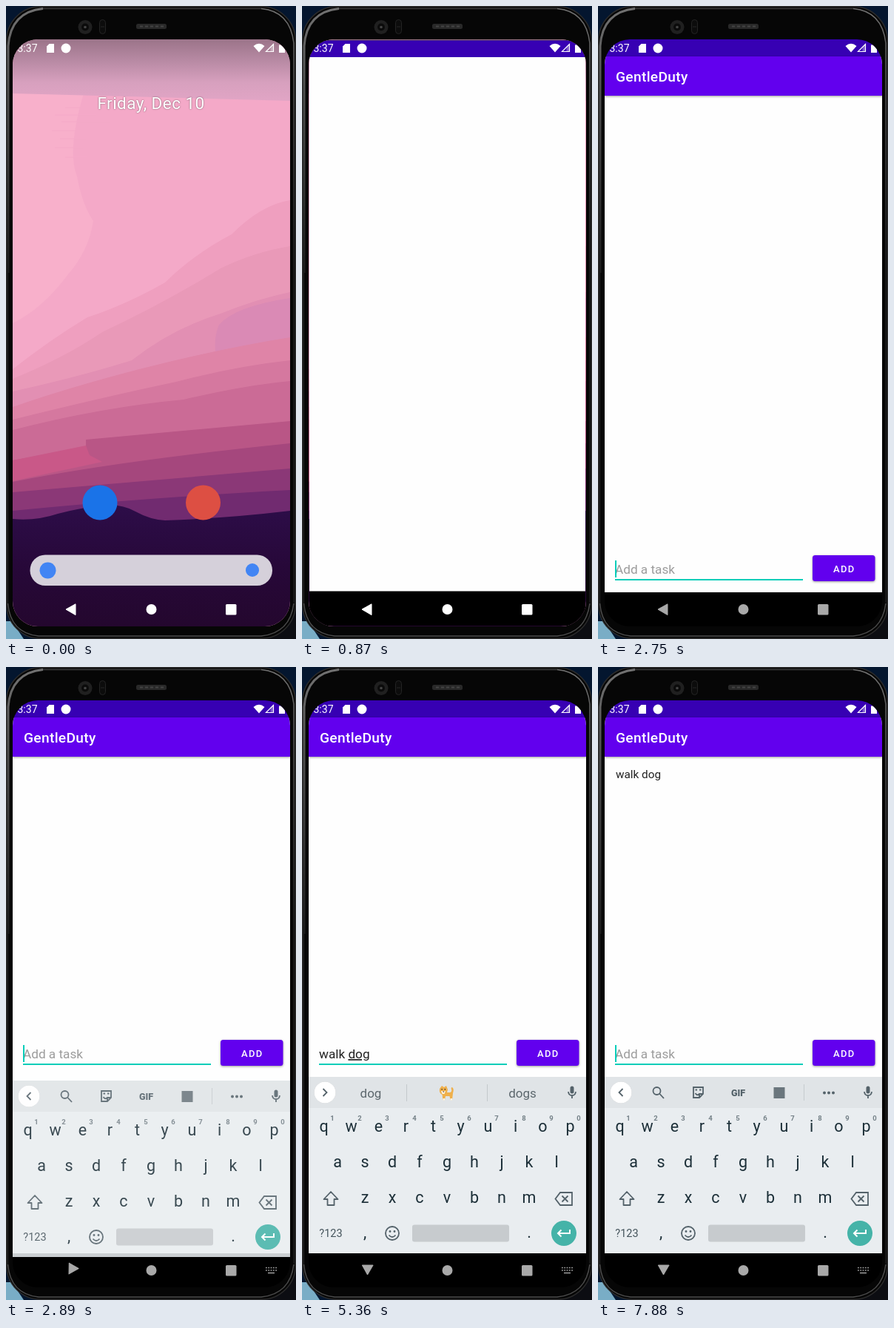
Animation, 392 px wide and 854 px high, one loop 8 s. Source, as an HTML page:

```html
<!DOCTYPE html>
<html lang="en">
<head>
<meta charset="utf-8">
<title>Task list demo</title>
<style>
html, body { margin: 0; width: 100%; height: 100%; overflow: hidden; background: #04162f; }
svg { display: block; width: 392px; height: 854px; font-family: Roboto, "Open Sans", sans-serif; }
[data-on] { visibility: hidden; }
.mid { text-anchor: middle; }
.bold { font-weight: 500; }
.field { font-size: 17.2px; }
.word { font-size: 17px; fill: #5c676d; text-anchor: middle; }
.key { font-size: 21.5px; fill: #1c2f38; text-anchor: middle; }
.digit { font-size: 9.5px; font-weight: 700; fill: #748087; text-anchor: middle; }
.line { fill: none; stroke: #54626a; stroke-width: 1.8; }
.raised { filter: drop-shadow(0 1.5px 1.5px rgba(0, 0, 0, .4)); }
</style>
</head>
<body>
<svg viewBox="0 0 392 854">
  <defs>
    <clipPath id="screen"><rect x="9" y="45" width="375" height="792" rx="34"/></clipPath>
    <linearGradient id="shade" x1="0" y1="0" x2="0" y2="1">
      <stop offset="0" stop-color="#9b7489"/><stop offset=".35" stop-color="#b88aa4"/>
      <stop offset=".7" stop-color="#d7a0be"/><stop offset="1" stop-color="#e1a5c5"/>
    </linearGradient>
    <linearGradient id="night" x1="0" y1="0" x2="0" y2="1">
      <stop offset="0" stop-color="#2d0d49"/><stop offset=".5" stop-color="#270839"/>
      <stop offset="1" stop-color="#24072e"/>
    </linearGradient>
    <linearGradient id="gleam" gradientUnits="userSpaceOnUse" x1="0" y1="0" x2="0" y2="360">
      <stop offset="0" stop-color="#727272"/><stop offset=".3" stop-color="#505050"/>
      <stop offset="1" stop-color="#1c1c1c"/>
    </linearGradient>
    <g id="nav">
      <circle cx="196.5" cy="814" r="7"/>
      <rect x="297" y="807" width="14.5" height="14.5" rx="1.5"/>
    </g>
    <path id="back" d="M81 814 94 806.8V821.6Z" stroke-width="1" stroke-linejoin="round"/>
    <path id="arrow" d="M.5.5V16L4.1 12.7 6.7 18.6 9.2 17.5 6.6 11.7H11.6Z" fill="#fff" stroke="#15152a" stroke-linejoin="round"/>
  </defs>

  <!-- phone body -->
  <path d="M0 830H8L24 854H0Z" fill="#79adc6"/>
  <path d="M340 854H392V800Z" fill="#0c0d12"/>
  <rect x=".7" y=".7" width="390.6" height="852.6" rx="46" fill="#060606" stroke="#2c2c2c" stroke-width="1.4"/>
  <g fill="none" stroke-width="1.5">
    <path d="M3 360V54Q6 8 50 3.500" stroke="url(#gleam)" stroke-width="3"/>
    <path d="M50 3.500H345" stroke="#3c3c3c"/>
    <path d="M345 3.500Q384 7 389 50V360" stroke="url(#gleam)"/>
    <path d="M389 360V805M2.500 360V806" stroke="#1c1c1c"/>
    <path d="M2.500 806Q6 846 44 850H345Q384 846 389 806" stroke="#4c4c4c"/>
  </g>
  <circle cx="107" cy="28.500" r="9.500" fill="#202020"/>
  <circle cx="107" cy="28.500" r="5" fill="#0b0b0b"/>
  <circle cx="107" cy="28.500" r="1.800" fill="#454545"/>
  <rect x="126.500" y="18.500" width="8" height="19" rx="4" fill="#0c0c0c" stroke="#242424"/>
  <path d="M128 28H133" stroke="#242424"/>
  <rect x="176" y="24" width="41" height="7" rx="2.500" fill="#292929"/>
  <path d="M181 27.500H213" stroke="#444" stroke-width="2" stroke-dasharray="4 3"/>

  <g clip-path="url(#screen)">
    <!-- home screen -->
    <g data-on="0-990">
      <path d="M9 45H384V837H9Z" fill="#f4a9c8"/>
      <path d="M9 118H105Q82 195 96 230 103 268 118 290 112 330 84 362 50 408 9 428Z" fill="#f8b0cb"/>
      <path d="M80 137H135M66 147H122M75 156H140M62 168H112M73 179H108M66 191H104M80 204H109" stroke="#f4a9c8"/>
      <path d="M9 45H384V128L200 123 9 118Z" fill="url(#shade)"/>
      <path d="M9 490Q60 450 110 420 160 404 215 373 255 334 305 308 345 268 384 262V700H9Z" fill="#ef9fbf"/>
      <path d="M9 503Q80 474 130 440 215 400 290 354 335 332 384 324V700H9Z" fill="#e999b8"/>
      <path d="M9 520Q100 500 170 478 225 435 290 415 340 395 384 386V700H9Z" fill="#e28fb3"/>
      <path d="M384 394Q310 405 288 430 280 448 284 475H384Z" fill="#da8ab5"/>
      <path d="M9 541Q80 516 180 490 290 462 384 447V700H9Z" fill="#df84a7"/>
      <path d="M9 558Q130 528 230 507 310 486 384 478V700H9Z" fill="#d5789f"/>
      <path d="M9 572Q130 541 240 531 320 512 384 506V700H9Z" fill="#cb6b96"/>
      <path d="M9 613 108 596V585L384 560V700H9Z" fill="#b95686"/>
      <path d="M9 613 108 593 113 606 130 615 9 641Z" fill="#c95888"/>
      <path d="M9 642Q150 614 384 590V700H9Z" fill="#a5477d"/>
      <path d="M9 656 384 624V700H9Z" fill="#8b3877"/>
      <path d="M9 681Q180 664 384 653V700H9Z" fill="#712b70"/>
      <path d="M9 692Q40 695 70 685 100 677 130 674 155 671 175 682 195 693 215 694 300 691 384 681V837H9Z" fill="url(#night)"/>
      <circle cx="127" cy="670" r="23.500" fill="#1a73e8"/>
      <circle cx="266.500" cy="670" r="23.500" fill="#dd4f43"/>
      <rect x="32.500" y="740.500" width="327.500" height="41.500" rx="20.500" fill="#d5d0da"/>
      <circle cx="56.500" cy="761.500" r="11" fill="#4285f4"/>
      <circle cx="333" cy="761" r="9" fill="#4285f4"/>
      <g data-on="710-870">
        <path d="M34 97H359V117H34Z" fill="#3700b3" opacity=".47"/>
        <path d="M34 117H359V745H34Z" fill="#fdfafb" opacity=".52"/>
        <path d="M34 745H359V785H34Z" opacity=".51"/>
      </g>
      <text x="123.500" y="139" font-size="22.500" letter-spacing=".45" fill="#fff" style="text-shadow:0 0 2px #0008">Friday, Dec 10</text>
    </g>

    <!-- launching window, then the app page -->
    <g data-on="870-990">
      <path d="M10 46.500H383V836H10Z"/>
      <path d="M10 46.500H383V69H10Z" fill="#3700b3"/>
      <path d="M10 69H383V789.500H10Z" fill="#fefefe"/>
    </g>
    <g data-on="990-8000">
      <path d="M9 45H384V837H9Z"/>
      <path d="M9 68H384V791H9Z" fill="#fefefe"/>
      <path d="M9 45H384V68H9Z" fill="#3700b3"/>
    </g>
    <g data-on="1520-8000">
      <path class="raised" d="M9 68H384V121H9Z" fill="#6200ee"/>
      <text class="bold" x="24" y="102" font-size="19.200" letter-spacing=".3" fill="#fff">GentleDuty</text>
    </g>
    <text data-on="6990-8000" x="24" y="150" font-size="15.300" fill="#212121">walk dog</text>

    <!-- input row -->
    <g id="row">
      <g data-on="1520-8000">
        <rect class="raised" x="290" y="741" width="84.500" height="35" rx="3.500" fill="#6200ee"/>
      </g>
      <rect data-on="6570-7140" x="290" y="741" width="84.500" height="35" rx="3.500" fill="#fff" opacity=".2"/>
      <text data-on="1520-8000" class="bold" x="318" y="764" font-size="13" letter-spacing="1.300" fill="#fff">ADD</text>
      <path data-on="1520-2630" d="M23 773.500H277" stroke="#777"/>
      <path data-on="2630-8000" d="M23 774H277" stroke="#03cdb9" stroke-width="2"/>
      <text data-on="1520-3850 6840-8000" class="field" x="23" y="766" fill="#9c9c9c">Add a task</text>
      <g id="typed" class="field" fill="#212121"></g>
    </g>

    <!-- keyboard -->
    <g id="kb" data-on="2890-8000">
      <path d="M9 553H384V791H9Z" fill="#e9edf0"/>
      <path d="M9 553H384V595H9Z" fill="#e0e4e7"/>
      <circle cx="31" cy="574" r="14.500" fill="#fff" style="filter:drop-shadow(0 .5px .5px #0003)"/>
      <g data-on="2890-3970 6990-8000">
        <path class="line" d="M33.500 569 28.500 574 33.500 579"/>
        <circle class="line" cx="79.500" cy="572" r="5"/>
        <path class="line" d="M83.500 576 89 582" stroke-width="2.200"/>
        <path class="line" d="M129 567H142V576L137 581H129ZM142 576H137V581M131.500 575Q134 579 137 576" stroke-width="1.600"/>
        <path d="M131.500 570.500H134M137 570.500H139.500" stroke="#54626a" stroke-width="2"/>
        <text class="mid" x="189.500" y="578.500" font-size="12.500" font-weight="900" fill="#54626a">GIF</text>
        <rect x="237.500" y="567" width="15" height="15" fill="#6a767d"/>
        <path d="M278.500 563V585" stroke="#c6cbce"/>
        <g fill="#54626a"><circle cx="306" cy="574.500" r="2"/><circle cx="312" cy="574.500" r="2"/><circle cx="318" cy="574.500" r="2"/></g>
      </g>
      <g data-on="3970-6990">
        <path class="line" d="M28.500 569 33.500 574 28.500 579"/>
        <path d="M141.500 563V586M250.500 563V586" stroke="#c3c9cc"/>
      </g>
      <g id="words"></g>
      <g data-on="4800-6990" fill="#efb04c">
        <path d="M186 569 189 565 192 567 195 565 197 570 196 574H200Q203 573 202 570 201 567 203 567 206 569 204 575L203 584H200.500L199.500 579H194L193 584H190.500L189.500 577Q185 575 186 569Z"/>
        <path d="M188 572H194L192.500 576H189.500ZM190.500 582H193V584.500H190.500ZM200.500 582H203V584.500H200.500Z" fill="#fff3dc"/>
        <path d="M190 572.500H192.500L191.200 574ZM188.500 569H189.700V570.500H188.500ZM192.700 569H194V570.500H192.700Z" fill="#3b2a22"/>
      </g>
      <rect x="362.500" y="565.500" width="5" height="10" rx="2.500" fill="#54626a"/>
      <path class="line" d="M360 573Q360.500 578 365 578T370 573M365 578V582" stroke-width="1.500"/>
      <g id="keys"></g>
      <path class="line" d="M39 708 29.500 718H34.500V726H43.500V718H48.500Z" stroke-linejoin="round"/>
      <path class="line" d="M349 709H365V726H349L342.500 717.500ZM351.500 713.500 359.500 721.500M359.500 713.500 351.500 721.500"/>
      <text class="mid" x="39" y="769" font-size="14.500" fill="#44535b">?123</text>
      <circle class="line" cx="122" cy="764" r="9"/>
      <path class="line" d="M117.500 766.500Q122 771.500 126.500 766.500" stroke-width="1.600"/>
      <circle cx="119" cy="761.500" r="1.400" fill="#54626a"/><circle cx="125" cy="761.500" r="1.400" fill="#54626a"/>
      <rect x="149" y="752.500" width="131" height="23" rx="3" fill="#c7cbce"/>
      <circle cx="354" cy="764" r="17" fill="#45b3a8"/>
      <path d="M362 759V764H346.500M350.500 759.500 346 764 350.500 768.500" fill="none" stroke="#fff" stroke-width="2"/>
    </g>

    <!-- navigation bar -->
    <use href="#nav" data-on="0-1690" fill="#fff"/>
    <use href="#nav" data-on="1690-1990" fill="#ccc"/>
    <use href="#nav" data-on="1990-8000" fill="#a9a9a9"/>
    <use href="#back" data-on="0-1690" fill="#fff" stroke="#fff"/>
    <use href="#back" data-on="1690-1990" fill="#ccc" stroke="#ccc"/>
    <g fill="#a9a9a9" stroke="#a9a9a9">
      <use href="#back" data-on="1990-2890"/>
      <use href="#back" data-on="2890-3010" transform="translate(0 -2) rotate(-60 89 814)"/>
      <use href="#back" data-on="3010-8000" transform="translate(-.5 -2) rotate(-90 89 814)"/>
    </g>
    <g data-on="2890-8000" fill="none" stroke="#a0a0a0" stroke-width="1.700">
      <path d="M351 810.500H366M351 814H366" stroke-dasharray="1.800 1.500"/>
      <path d="M354 817.500H363"/>
    </g>

    <!-- status bar -->
    <g fill="#fff">
      <text x="15.500" y="62" font-size="14">3:37</text>
      <path d="M58.500 51H65V63H55V54.500Z"/>
      <circle cx="81" cy="57" r="6.500"/>
      <path d="M334.500 54Q342 47.500 349.500 54L342 62.500Z"/>
      <path d="M361.500 51.500V61.500H351.500Z" fill="none" stroke="#fff" stroke-width="1.200"/>
      <path d="M357.500 55 362 51V62H357.500Z" opacity=".35"/>
      <path d="M369 52.500H371V51H377V63H369Z"/>
    </g>
  </g>
  <g id="mouse"></g>
</svg>
<script>
const LOOP = 8000;
const $ = id => document.getElementById(id);
const add = (id, markup) => $(id).insertAdjacentHTML('beforeend', markup);

// keyboard letters: row, first x, baseline
[['qwertyuiop', 29.5, 627], ['asdfghjkl', 48, 675], ['zxcvbnm', 85, 723]].forEach(([row, x0, y], r) => {
  [...row].forEach((ch, i) => {
    const x = x0 + 37 * i;
    add('keys', `<text class="key" x="${x}" y="${y}">${ch}</text>`);
    if (!r) add('keys', `<text class="digit" x="${x + 11.5}" y="611.5">${(i + 1) % 10}</text>`);
  });
});
add('keys', '<text class="key" x="85" y="770">,</text><text class="key" x="307" y="770">.</text>');

// typed text: visible span, finished part, underlined part
[
  ['3850-3970', '', 'w'], ['3970-4530', '', 'walk'], ['4530-4650', 'walk ', 'd'],
  ['4650-4800', 'walk ', 'do'], ['4800-6840', 'walk ', 'dog']
].forEach(([on, done, part]) => add('typed',
  `<text data-on="${on}" x="23" y="766">${done}<tspan style="text-decoration:underline 1px #777">${part}</tspan></text>`));

// blinking caret
[
  [23, '2750-3290 6840-7420 7880-8000'], [36, '3850-3970'], [58.5, '3970-4530'],
  [72, '4530-4650'], [81.5, '4650-4800'], [91.5, '4800-5360 5920-6440']
].forEach(([x, on]) => add('typed',
  `<rect data-on="${on}" x="${x}" y="748" width="2" height="23" fill="#03cdb9"/>`));

// suggestions
[
  ['3970-4530', 'walk', 'walked', 'walking'], ['4530-4650', 'day', 'dog', 'down'],
  ['4650-4800', 'do', 'dog', 'down'], ['4800-6990', 'dog', '', 'dogs']
].forEach(([on, ...words]) => words.forEach((word, i) => add('words',
  `<text class="word" data-on="${on}" x="${[93, 196, 298][i]}" y="581">${word}</text>`)));

// mouse pointer stops
[
  ['1840-1990', 353, 538], ['1990-2110', 178, 739], ['2110-2230', 140, 763],
  ['2230-2480', 124, 772], ['2480-2630', 123, 765], ['6320-6440', 359, 519],
  ['6440-6570', 345, 517], ['6570-6990', 338, 517], ['6990-7140', 375, 519]
].forEach(([on, x, y]) => add('mouse', `<use href="#arrow" data-on="${on}" x="${x}" y="${y}"/>`));

const timed = [...document.querySelectorAll('[data-on]')].map(el => ({
  el, spans: el.dataset.on.split(' ').map(s => s.split('-').map(Number))
}));

function draw(t) {
  for (const { el, spans } of timed) {
    el.style.visibility = spans.some(([a, b]) => t >= a && t < b) ? 'visible' : 'hidden';
  }
  const rising = t < 3010;
  $('row').setAttribute('transform', `translate(0 ${t < 2890 ? 0 : -238})`);
  $('kb').setAttribute('transform', `translate(0 ${rising ? 5 : 0})`);
  $('kb').setAttribute('opacity', rising ? .87 : 1);
}

const start = performance.now();
function tick() {
  draw((performance.now() - start) % LOOP);
  requestAnimationFrame(tick);
}
tick();
</script>
</body>
</html>
```
